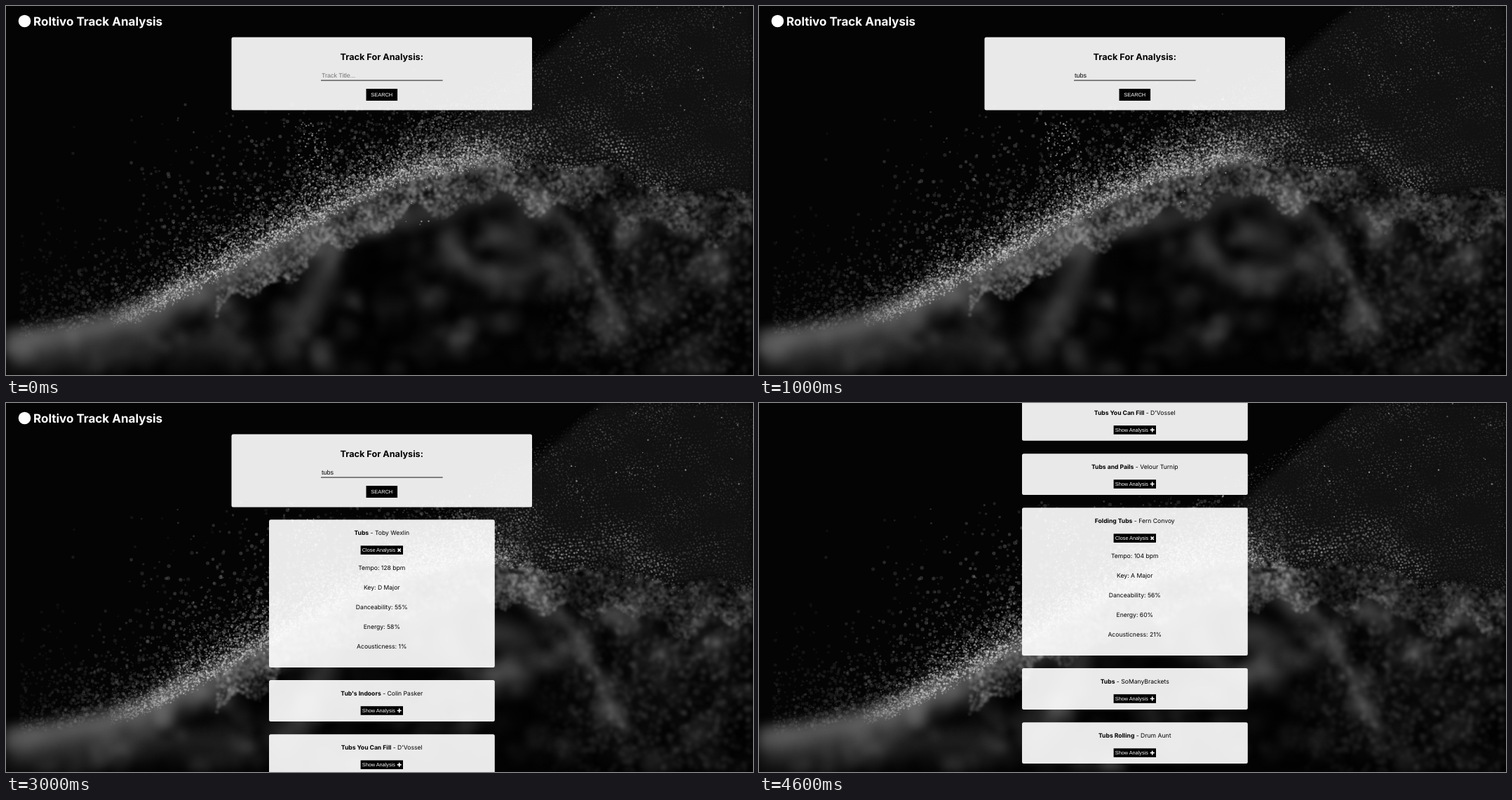
Recreate the animation shown at these times as an HTML page with a canvas. Size 1065 by 526 pixels, loop 5000 ms.

```html
<!DOCTYPE html>
<html lang="en">
<head>
<meta charset="utf-8">
<title>Track Analysis</title>
<style>
  html, body { margin: 0; width: 100%; height: 100%; overflow: hidden; background: #000; }
  canvas, svg { position: absolute; left: 0; top: 0; width: 1065px; height: 526px; }
  text { font-family: Inter, sans-serif; font-size: 8.6px; text-anchor: middle; text-rendering: geometricPrecision; }
  .brand { font-size: 17px; font-weight: 700; text-anchor: start; fill: #fff; }
  .head { font-size: 12.65px; font-weight: 700; }
  .field { font: 8.93px "Liberation Sans", Arial, sans-serif; text-anchor: start; }
  .btn { font: 7.44px "Liberation Sans", Arial, sans-serif; fill: #fff; }
  .left { text-anchor: start; font-size: 7.3px; }
  .bold { font-weight: 700; }
  .panel { fill: #fff; fill-opacity: .915; }
</style>
</head>
<body>
<canvas id="bg" width="1065" height="526"></canvas>
<svg id="ui" viewBox="0 0 1065 526"></svg>
<script>
const W = 1065, H = 526, CX = 535.75, STEP = 1000, STEPS = 5;
const view = document.getElementById('bg').getContext('2d');
const ui = document.getElementById('ui');

const songs = [
  ['Tubs', 'Toby Wexlin'], ["Tub's Indoors", 'Colin Pasker'],
  ['Tubs You Can Fill', "D'Vossel"], ['Tubs and Pails', 'Velour Turnip'],
  ['Folding Tubs', 'Fern Convoy'], ['Tubs', 'SoManyBrackets'],
  ['Tubs Rolling', 'Drum Aunt']
];
const stats = {
  0: ['128 bpm', 'D Major', '55%', '58%', '1%'],
  4: ['104 bpm', 'A Major', '56%', '60%', '21%']
};
const labels = ['Tempo', 'Key', 'Danceability', 'Energy', 'Acousticness'];

// ---- particle landscape ----
function seeded(s) {
  return () => {
    s = (s + 0x6D2B79F5) | 0;
    let t = Math.imul(s ^ (s >>> 15), 1 | s);
    t = (t + Math.imul(t ^ (t >>> 7), 61 | t)) ^ t;
    return ((t ^ (t >>> 14)) >>> 0) / 4294967296;
  };
}
const clamp = v => Math.min(1, Math.max(0, v));

const crest = [[0, 472], [100, 456], [190, 434], [270, 396], [340, 356], [420, 312],
  [500, 270], [570, 240], [640, 224], [700, 214], [780, 228], [860, 222], [940, 262], [1065, 265]];

function crestY(x, phase) {
  let i = 1;
  while (i < crest.length - 1 && crest[i][0] < x) i++;
  const [x0, y0] = crest[i - 1], [x1, y1] = crest[i];
  const sway = clamp((x - 560) / 200);
  return y0 + (y1 - y0) * (x - x0) / (x1 - x0)
    + sway * (12 * Math.sin(phase) * Math.cos(x / 75 + phase) + 4 * Math.sin(x / 14 + phase));
}

// Edge of the dotted sheet at the upper right
const sheetTop = x => (850 - x) * .643;

// Smooth patchiness in the range 0..1
const patch = (x, y, p) =>
  .5 + .25 * Math.sin(x / 31 + y / 19 + p) + .25 * Math.sin(x / 17 - y / 27 - p * .7);

function newCanvas() {
  const cv = document.createElement('canvas');
  cv.width = W;
  cv.height = H;
  return cv;
}

function layer(c, blur, draw) {
  const cv = newCanvas();
  draw(cv.getContext('2d'));
  c.filter = `blur(${blur}px)`;
  c.drawImage(cv, 0, 0);
  c.filter = 'none';
}

function dot(c, x, y, r, a, g = 215) {
  c.fillStyle = `rgba(${g},${g},${g},${a})`;
  c.beginPath();
  c.arc(x, y, r, 0, 7);
  c.fill();
}

function band(c, pts, width, blur, alpha) {
  layer(c, blur, l => {
    l.strokeStyle = `rgba(165,165,165,${alpha})`;
    l.lineWidth = width;
    l.lineJoin = l.lineCap = 'round';
    l.beginPath();
    pts.forEach(([x, y]) => l.lineTo(x, y));
    l.stroke();
  });
}

function pit(c, x, y, rx, ry, alpha) {
  layer(c, 15, l => {
    l.fillStyle = `rgba(0,0,0,${alpha})`;
    l.beginPath();
    l.ellipse(x, y, rx, ry, 0, 0, 7);
    l.fill();
  });
}

function haze(c, phase) {
  const rnd = seeded(11);
  layer(c, 6, l => {
    for (let i = 0; i < 900; i++) {
      const x = rnd() * W, y = crestY(x, phase) + 8 + rnd() * 270;
      const p = patch(x, y, phase);
      dot(l, x, y, 6 + rnd() * 13, .02 + .2 * p * p, 125);
    }
  });

  const along = [];
  for (let x = -20; x <= 700; x += 20) along.push([x, crestY(x, phase) + 4]);
  const s = 8 * Math.sin(phase);
  band(c, along, 24, 9, .36);
  band(c, [[-20, 480], [60, 474], [130, 460], [200, 434], [260, 398]], 24, 10, .28);
  band(c, [[-20, 494], [90, 484], [180, 464], [250, 430], [330, 384], [410, 334]], 26, 12, .34);
  band(c, [[-20, 516], [120, 504], [250, 482], [350, 492]], 26, 14, .25);
  band(c, [[420, 356], [480, 325], [560, 306 + s], [640, 280], [720, 266 - s], [770, 290]], 30, 9, .2);
  band(c, [[790, 300], [815, 330 + s], [845, 395], [885, 470]], 14, 7, .3);
  band(c, [[460, 360], [435, 425], [395, 490]], 34, 13, .28);
  band(c, [[630, 335], [665, 380 + s], [720, 385], [780, 365]], 22, 10, .26);
  band(c, [[690, 320], [740, 345 - s]], 26, 12, .25);

  pit(c, 365, 412, 34, 28, .6);
  pit(c, 550, 385, 70, 42, .75);
  pit(c, 550, 465, 70, 32, .4);
  pit(c, 755, 440, 50, 45, .5);
  pit(c, 820, 262, 34, 14, .5);
  pit(c, 990, 470, 85, 60, .4);
}

// Out-of-focus grains hanging under the crest and on the right slope
function grains(c, phase) {
  const rnd = seeded(51);
  layer(c, 1.3, l => {
    for (let i = 0; i < 5200; i++) {
      const x = 300 + rnd() * (W - 300);
      const y = crestY(x, phase) + rnd() * 78 * (.55 + .5 * patch(x * 1.6, 0, phase));
      const dim = x > 800 ? .6 : 1;
      dot(l, x, y, 1.5 + rnd() * 1.8, (.08 + .26 * patch(x, y, phase) * rnd()) * dim, 165);
    }
  });
  layer(c, 2, l => {
    for (let i = 0; i < 1500; i++) {
      const x = 760 + rnd() * 305, y = 275 + rnd() * 250;
      dot(l, x, y, 2 + rnd() * 3, rnd() * .17 * clamp((x - 740) / 120), 140);
    }
  });
}

function mesh(c, phase) {
  const rnd = seeded(23);
  layer(c, 5, l => {
    l.fillStyle = 'rgba(60,60,60,.24)';
    l.beginPath();
    l.moveTo(850, 0);
    l.lineTo(W, 0);
    for (let x = W; x >= 560; x -= 15) l.lineTo(x, crestY(x, phase));
    l.fill();
  });

  for (let row = -15; row < 82; row++) {
    for (let x = 560 + (row % 2) * 2.2; x < W; x += 4.5) {
      const px = x + rnd() * 3;
      const y = row * 4.2 + (850 - x) * .2 + 6 * Math.sin(x / 48 + row / 7 + phase) + rnd() * 3;
      const gap = crestY(px, phase) - y;
      if (y < sheetTop(px) || gap < -14 * rnd()) continue;
      const near = clamp(1 - Math.abs(gap - 22) / 65) * clamp((1080 - px) / 200);
      const p = patch(px, y * 1.6, phase);
      const a = (.03 + .27 * p * rnd() + .5 * near * (.3 + .7 * p) * rnd()) * (px > 960 ? .75 : 1);
      dot(c, px, y, .9 + near * .5 + rnd() * .5, a, 190);
    }
  }
}

function spray(c, phase) {
  const rnd = seeded(37);
  const spread = () => -Math.log(1 - rnd());
  // soft, distant specks
  layer(c, .6, l => {
    for (let i = 0; i < 2600; i++) {
      const x = 20 + rnd() * 640;
      const up = spread() * (x < 180 ? 38 : 65);
      const y = crestY(x, phase) - up + 6 * Math.sin(phase + i);
      if (y > 140) dot(l, x, y, 1 + rnd() * 1.8, .06 + rnd() * .24 * clamp(x / 260), 160);
    }
  });
  // sharp specks thrown off the crest
  for (let i = 0; i < 6200; i++) {
    const x = 150 + rnd() * 600;
    const up = (spread() + spread()) * (x < 240 ? 11 : 17) - 14;
    const y = crestY(x, phase) - up + 3 * Math.sin(phase + i);
    const ends = clamp((x - 120) / 140) * clamp((800 - x) / 150);
    const fade = Math.max(.4, 1 - Math.abs(up) / 150) * ends;
    dot(c, x, y, .75 + rnd() * .85, (.12 + rnd() * .52) * fade, 205);
  }
  // rising plume
  for (let i = 0; i < 170; i++) {
    const y = 165 + rnd() * 130, x = 405 + rnd() * 50 + (y - 165) * .15;
    dot(c, x, y, .7 + rnd() * .7, .2 + rnd() * .45);
  }
  for (let i = 0; i < 90; i++) {
    const x = 560 + rnd() * 490, y = Math.max(sheetTop(x), 0) + rnd() * 150;
    dot(c, x, y, .7 + rnd() * .6, .25 + rnd() * .35);
  }
}

function landscape(step) {
  const cv = newCanvas();
  const c = cv.getContext('2d'), phase = step * .65;
  c.fillStyle = '#040404';
  c.fillRect(0, 0, W, H);
  haze(c, phase);
  grains(c, phase);
  mesh(c, phase);
  spray(c, phase);
  const shade = c.createLinearGradient(0, 460, 0, H);
  shade.addColorStop(0, 'rgba(0,0,0,0)');
  shade.addColorStop(1, 'rgba(0,0,0,.35)');
  c.fillStyle = shade;
  c.fillRect(0, 460, W, H - 460);
  return cv;
}

// ---- interface ----
const text = (x, y, cls, s) => `<text x="${x}" y="${y}" class="${cls}">${s}</text>`;
const rect = (x, y, w, h, extra = '') => `<rect x="${x}" y="${y}" width="${w}" height="${h}" ${extra}/>`;
const panel = (x, y, w, h) => rect(x, y, w, h, 'rx="2.5" class="panel"');

function searchBox(query) {
  return '<circle cx="26.5" cy="21.5" r="8.8" fill="#fff"/>' +
    text(39, 28, 'brand', 'Roltivo Track Analysis') +
    panel(321.5, 44.5, 428.5, 104) +
    text(CX, 77.2, 'head', 'Track For Analysis:') +
    (query ? text(450, 101.6, 'field', query)
           : `<g fill="#757575">${text(450, 101.6, 'field', 'Track Title...')}</g>`) +
    rect(449, 105.6, 173.6, .9) +
    rect(513.5, 118, 44.6, 17) +
    text(CX, 129.2, 'btn', 'SEARCH');
}

function songCard(i, top, open) {
  const [title, artist] = songs[i];
  const turn = open ? 'rotate(45)' : '';
  let s = panel(375, top, 321.8, open ? 210.7 : 58.8) +
    text(CX, top + 21.7, '', `<tspan class="bold">${title}</tspan> - ${artist}`) +
    rect(505.6, top + 37.1, 60.4, 12.6) +
    text(507.8, top + 46, 'btn left', open ? 'Close Analysis' : 'Show Analysis') +
    `<path d="M-3 0H3M0 -3V3" transform="translate(560.7 ${top + 43.4}) ${turn}" stroke="#fff" stroke-width="1.6"/>`;
  if (open) labels.forEach((name, n) => {
    s += text(CX, top + 71.6 + n * 27.95, '', `${name}: ${stats[i][n]}`);
  });
  return s;
}

function songList(top, first, opened) {
  let s = '';
  for (let i = first; i < songs.length && top < H; i++) {
    s += songCard(i, top, i === opened);
    top += i === opened ? 228.8 : 77.15;
  }
  return s;
}

const scenes = [
  () => searchBox(''),
  () => searchBox('tubs'),
  () => searchBox('tubs') + songList(166.3, 0, -1),
  () => searchBox('tubs') + songList(166.3, 0, 0),
  () => songList(-5, 2, 4)
];

const cache = [];
let shown = -1;
function tick() {
  const step = Math.floor(performance.now() / STEP) % STEPS;
  if (step !== shown) {
    shown = step;
    cache[step] = cache[step] || landscape(step);
    view.drawImage(cache[step], 0, 0);
    ui.innerHTML = scenes[step]();
  }
  requestAnimationFrame(tick);
}
tick();
</script>
</body>
</html>
```
